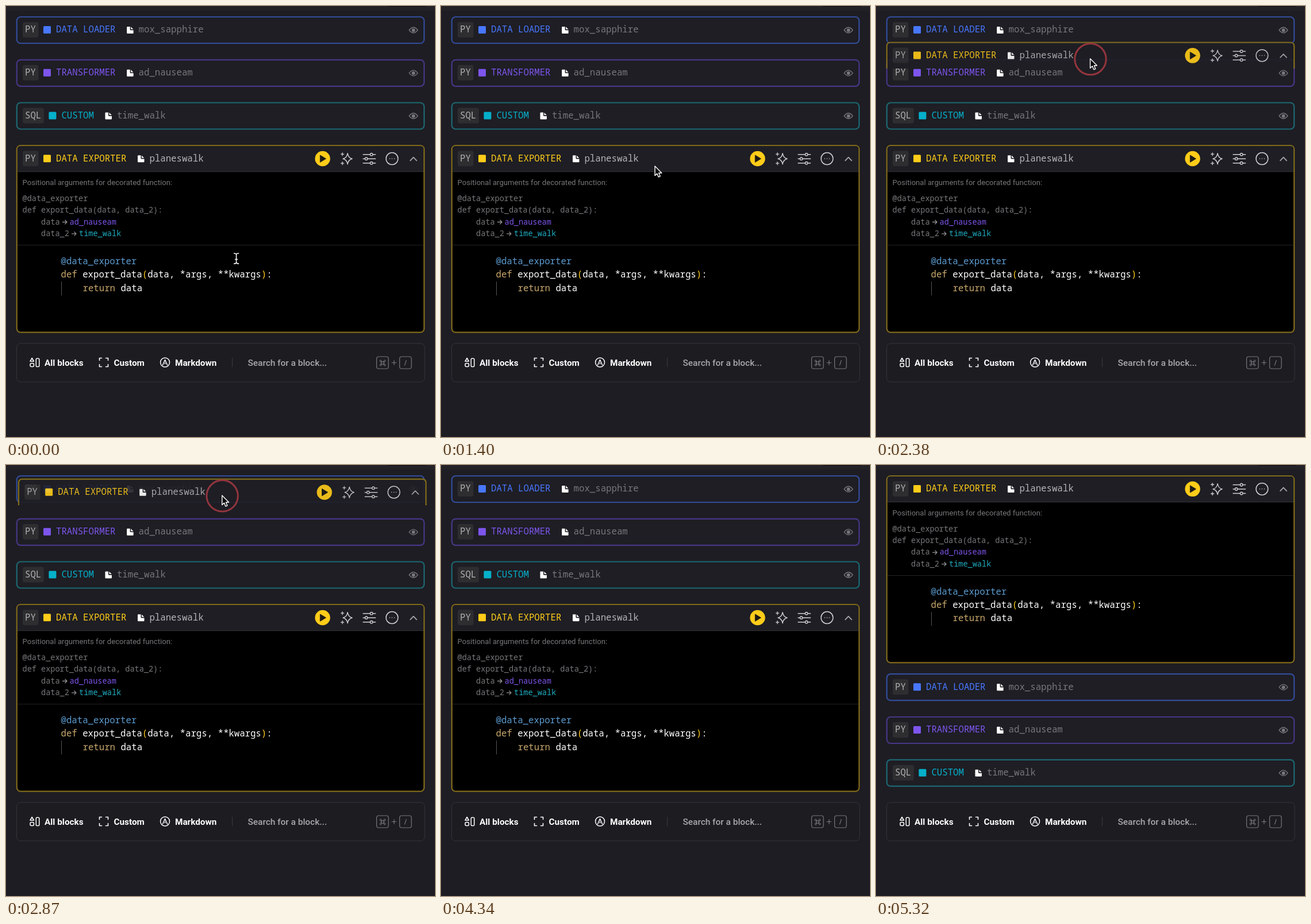
Recreate the animation shown at these times as an HTML page. Size 746 px wide and 751 px high, loop 5670 ms.

```html
<!DOCTYPE html>
<html lang="en">
<head>
<meta charset="utf-8">
<title>Reordering blocks</title>
<style>
  html, body { margin: 0; width: 100%; height: 100%; overflow: hidden; background: #1e1d23; }
  svg { display: block; }
  text { white-space: pre; }
  .mono { font: 15.7px "Noto Sans Mono", monospace; }
  .small { font: 13.55px "Noto Sans Mono", monospace; }
  .ui { font: 600 15.3px Roboto, sans-serif; fill: #fff; }
  .line { fill: none; stroke-linecap: round; stroke-linejoin: round; }
</style>
</head>
<body>
<svg id="stage" width="746" height="751" viewBox="0 0 746 751"></svg>
<script>
const LOOP = 5670, STEP = 70, CHAR = 9.42;
const stage = document.getElementById('stage');

const text = (x, y, str, fill, cls = 'mono') =>
  `<text class="${cls}" x="${x}" y="${y}" fill="${fill}">${str}</text>`;
const path = (d, stroke, width = 1.5, fill = 'none') =>
  `<path class="line" d="${d}" stroke="${stroke}" stroke-width="${width}" style="fill:${fill}"/>`;
const rect = (x, y, w, h, rx, fill, stroke = 'none', sw = 1) =>
  `<rect x="${x}" y="${y}" width="${w}" height="${h}" rx="${rx}" fill="${fill}" stroke="${stroke}" stroke-width="${sw}"/>`;
const circle = (x, y, r, fill, stroke = 'none', sw = 1) =>
  `<circle cx="${x}" cy="${y}" r="${r}" fill="${fill}" stroke="${stroke}" stroke-width="${sw}"/>`;

// Header contents, laid out from a block whose outer top edge is y = 0
function label(lang, title, name, color, nameColor) {
  const wide = (lang.length - 2) * CHAR;
  const end = 87 + wide + title.length * CHAR;
  const i = end + 19.5;
  return rect(29, 10, 27.5 + wide, 27, 3.5, '#2e2e31')
    + text(33, 28.4, lang, '#b0b0b3')
    + rect(65 + wide, 17, 13, 13, 1.5, color)
    + text(87 + wide, 28.4, title, color)
    + `<path d="M${i + 1} 18h4.5v5q0 1.2 1.2 1.2h4.8v4.8q0 1-1 1h-9.5q-1 0-1-1v-10q0-1 1-1zM${i + 7} 18.3l4.3 4.3h-4.3z" fill="#fff"/>`
    + text(end + 40, 28.4, name, nameColor);
}

const eye = path('M701 24Q708.5 14.5 716 24Q708.5 33.5 701 24Z', '#77777c', 1.3)
  + circle(708.5, 24.3, 3, '#77777c');

function collapsed(lang, title, name, color, border) {
  return rect(18.8, 1, 708.3, 46, 6.5, '#1e1e24', border, 2.2)
    + label(lang, title, name, color, '#77777b') + eye;
}

const tools = circle(550.5, 23.8, 13.2, '#ffcc19')
  + '<path d="M546.3 17.8v12.2l10-6.1z" fill="#1c1a14" stroke="#1c1a14" stroke-linejoin="round"/>'
  + path('M594 14.5Q595.3 22.6 602 24Q595.3 25.4 594 33.5Q592.7 25.4 586 24Q592.7 22.6 594 14.5Z', '#d0d0d2', 1.4)
  + path('M585 13.5v5M582.5 16h5M585 29.5v5M582.5 32h5', '#d0d0d2', 1.3)
  + path('M621 16.5h12M638 16.5h4.5M621 24h3M629 24h13.5M621 31.5h12M638 31.5h4.5', '#d0d0d2', 1.4)
  + [[635.5, 16.5], [626.5, 24], [635.5, 31.5]].map(([x, y]) => circle(x, y, 2.2, 'none', '#d0d0d2', 1.4)).join('')
  + circle(671.3, 23.8, 10.4, 'none', '#d0d0d2', 1.5)
  + [667.3, 671.3, 675.3].map(x => circle(x, 23.8, 0.8, '#d0d0d2')).join('')
  + path('M703 27.2L708.5 21.4L714 27.2', '#a5a5aa', 1.8);

const exporterHead = label('PY', 'DATA EXPORTER', 'planeswalk', '#ffcc19', '#b6b6b9') + tools;
const arrow = (x, y) => path(`M${x} ${y}h7.5m-3.2 -3.2l3.2 3.2l-3.2 3.2`, '#929296', 1.3);
const gray = '#77777b', gold = '#ffcc19', key = '#c9a86c';

const exporter = rect(18.8, 1, 708.3, 325.4, 6.5, '#000', '#806a1b', 2.2)
  + '<path d="M20 46.5V7q0-5 5-5h696q5 0 5 5v39.5z" fill="#1e1e24"/>'
  + rect(20, 46, 706, 1, 0, '#35353a')
  + exporterHead
  + `<text x="28.5" y="70" fill="#77777b" style="font:13.13px Roboto,sans-serif">Positional arguments for decorated function:</text>`
  + text(28.5, 98.3, '@data_exporter', gray, 'small')
  + text(28.5, 118, 'def export_data(data, data_2):', gray, 'small')
  + text(61, 138.4, 'data', gray, 'small') + arrow(98.5, 134.3)
  + text(110.5, 138.4, 'ad_nauseam', '#7d55ec', 'small')
  + text(61, 158.8, 'data_2', gray, 'small') + arrow(114.5, 154.7)
  + text(127, 158.8, 'time_walk', '#1fadc0', 'small')
  + rect(20, 174, 706, 1, 0, '#242427')
  + text(95.5, 208.2, '@data_exporter', '#5b9bd0')
  + text(95.5, 231.2, `<tspan fill="${key}">def</tspan> export_data<tspan fill="${gold}">(</tspan>data, *args, **kwargs<tspan fill="${gold}">)</tspan>:`, '#fff')
  + text(133.5, 254.4, `<tspan fill="${key}">return</tspan> data`, '#fff')
  + rect(96, 238, 1, 24, 0, '#55555a');

const ghost = '<path d="M18 46.5V6q0-6 6-6h698q6 0 6 6v40.5z" fill="#1e1e24"/>'
  + '<path d="M18.8 46.5V7.5q0-6.5 6.5-6.5h695.3q6.5 0 6.5 6.5v39" fill="none" stroke="#8d751b" stroke-width="2.2"/>'
  + exporterHead;

const toolbar = rect(18.5, 588, 709.5, 67, 7, '#1c1c21', '#34343a')
  + path('M45.2 613.5l3.3 5.6h-6.6z', '#fff', 1.5)
  + rect(42, 622.5, 6.5, 6, 2.5, 'none', '#fff', 1.5)
  + rect(52.3, 614.3, 5.5, 14.2, 1.5, 'none', '#fff', 1.5)
  + text(67, 626.5, 'All blocks', '#fff', 'ui')
  + path('M162.5 617.5v-4h4M173.5 613.5h4v4M177.5 624.5v4h-4M166.5 628.5h-4v-4', '#fff', 1.6)
  + text(187.5, 626.5, 'Custom', '#fff', 'ui')
  + circle(276.5, 621, 8, 'none', '#fff', 1.5)
  + path('M272.5 625.5L276.5 616.5L280.5 625.5M276.5 622v1.5', '#fff', 1.5)
  + text(294, 626.5, 'Markdown', '#fff', 'ui')
  + rect(393, 613, 1, 16, 0, '#3a3a40')
  + '<text x="420.5" y="626.5" fill="#a9a9ad" style="font:500 15.4px Roboto,sans-serif">Search for a block...</text>'
  + rect(644.5, 611, 20.5, 21, 3.5, 'none', '#77777c', 1.2)
  + rect(684.5, 611, 20.5, 21, 3.5, 'none', '#77777c', 1.2)
  + path('M653 620h4v4h-4zM653 620h-1.5a1.5 1.5 0 1 1 1.5-1.5zM657 620v-1.5a1.5 1.5 0 1 1 1.5 1.5zM657 624h1.5a1.5 1.5 0 1 1-1.5 1.5zM653 624v1.5a1.5 1.5 0 1 1-1.5-1.5z', '#8a8a8f', 0.9)
  + path('M671 621.5h7.5M674.75 617.8v7.5', '#77777c', 1.2)
  + path('M693.3 626l2.8-8.5', '#8a8a8f', 1);

const group = (id, body) => `<g id="${id}">${body}</g>`;

stage.innerHTML = rect(0, 0, 746, 751, 0, '#1e1d23')
  + rect(0, 0, 746, 8, 0, '#222227')
  + rect(664, 0, 66, 1, 0, '#0c0c0f')
  + group('loader', collapsed('PY', 'DATA LOADER', 'mox_sapphire', '#4877ff', '#324c9b'))
  + group('transformer', collapsed('PY', 'TRANSFORMER', 'ad_nauseam', '#7d55ec', '#473687'))
  + group('custom', collapsed('SQL', 'CUSTOM', 'time_walk', '#05b0cb', '#1c6873'))
  + group('exporter', exporter)
  + toolbar
  + group('ghost', ghost)
  + group('press', circle(0.4, 0.8, 27.2, 'none', '#93353d', 3))
  + group('pointer', '<path d="M0 0V16.5L3.7 13L6.2 19L9.2 17.7L6.7 12H11.8Z" fill="#08080a" stroke="#fff" stroke-width="1.4" stroke-linejoin="round"/>')
  + group('beam', path('M-4-9Q-.5-9 0-7Q.5-9 4-9M0-7V7M-4 9Q-.5 9 0 7Q.5 9 4 9M-2 1.5h4', '#fff', 1.5));

const el = Object.fromEntries([...stage.querySelectorAll('g[id]')].map(g => [g.id, g]));

// time, x, y of the mouse
const track = [
  [0, 400.5, 440], [1400, 372, 279], [1540, 372.5, 271.5],
  [1890, 375, 324.7], [2380, 372.5, 91.8], [2870, 375.7, 53]
];
const GRAB = [372.5, 271.5];
const TOP = 18, EXPORTER_TOP = 242.2, SHIFT = 345.2;
const HOMES = { loader: 18, transformer: 92.8, custom: 167.5 };

const ramp = (t, a, b) => Math.min(1, Math.max(0, (t - a) / (b - a)));
const ease = k => (1 - Math.cos(Math.PI * k)) / 2;

function mouse(t) {
  const i = track.findIndex(k => k[0] > t);
  if (i < 0) return track[track.length - 1].slice(1);
  const [a, b] = [track[i - 1], track[i]];
  const k = ease(ramp(t, a[0], b[0]));
  return [a[1] + (b[1] - a[1]) * k, a[2] + (b[2] - a[2]) * k];
}

function place(g, x, y, opacity = 1, scale = 1) {
  g.setAttribute('transform', `translate(${x.toFixed(2)} ${y.toFixed(2)}) scale(${scale})`);
  g.setAttribute('opacity', opacity);
}

function draw(t) {
  const [x, y] = mouse(t);
  const moved = t >= 4620;
  for (const id in HOMES) place(el[id], 0, HOMES[id] + (moved ? SHIFT : 0));
  place(el.exporter, 0, moved ? TOP : EXPORTER_TOP);

  // the dragged header follows the mouse, then returns home on release
  const back = ramp(t, 3010, 3430);
  const stay = 1 - ease(back);
  const dragging = t >= 1610 && back < 1;
  place(el.ghost, (x - GRAB[0]) * stay, EXPORTER_TOP + (y - GRAB[1]) * stay, dragging ? 0.9 * (1 - back * back) : 0);

  const down = ramp(t, 1470, 1680) * (1 - ramp(t, 2940, 3150));
  place(el.press, x, y, down, 0.7 + 0.3 * down);

  const shown = 1 - ramp(t, 4130, 4340);
  const inCode = y > 416;
  place(el.pointer, x, y, inCode ? 0 : shown);
  place(el.beam, x, y, inCode ? 1 : 0);
}

const start = performance.now();
function tick() {
  const t = (performance.now() - start) % LOOP;
  draw(Math.floor(t / STEP) * STEP);
  requestAnimationFrame(tick);
}
tick();
</script>
</body>
</html>
```
